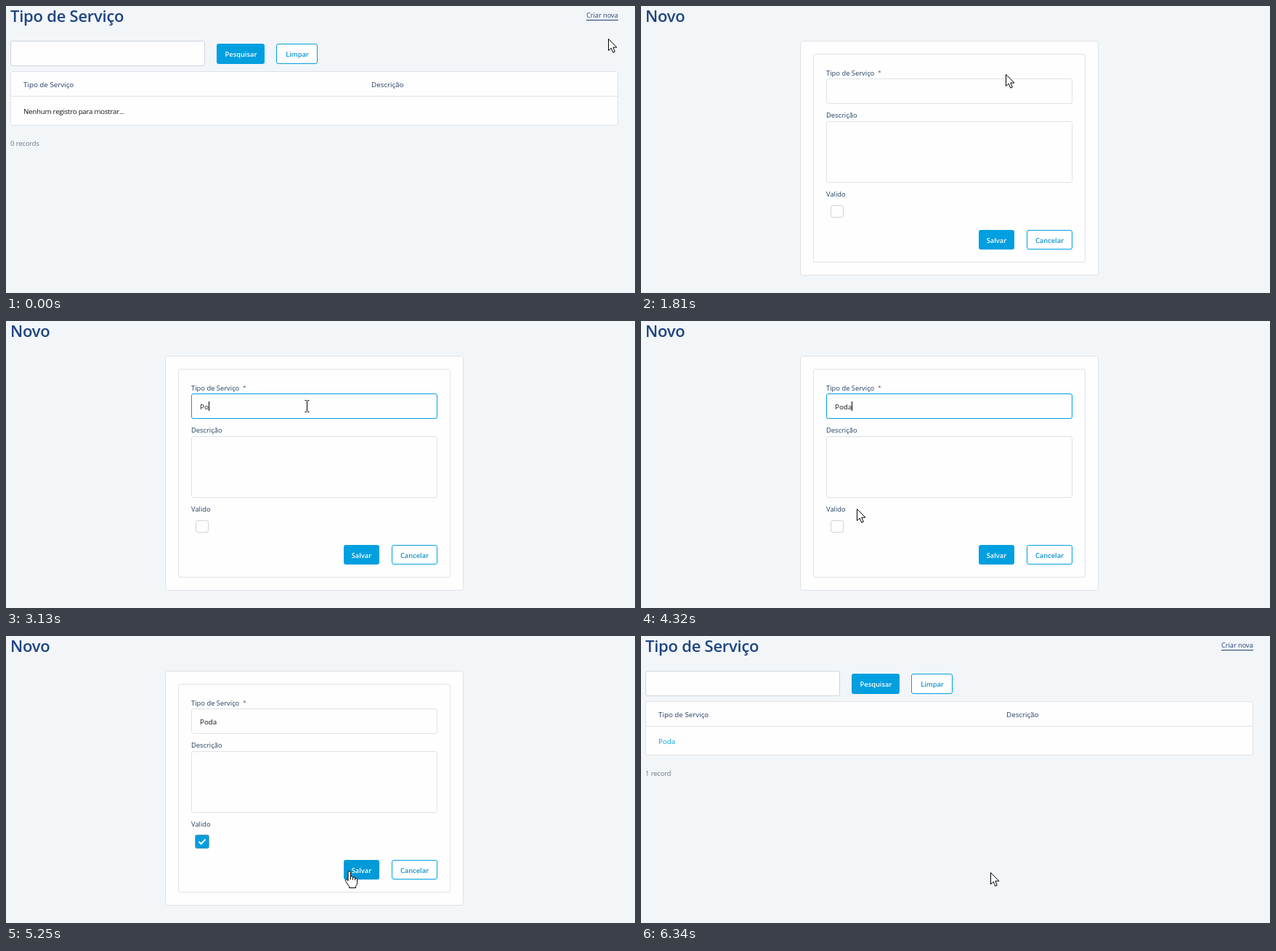
Animation, 866 px wide and 396 px high, one loop 6.51 s. Source, as an HTML page:

```html
<!DOCTYPE html>
<html lang="pt">
<head>
<meta charset="utf-8">
<title>Tipo de Serviço</title>
<style>
html, body { margin: 0; width: 100%; height: 100%; overflow: hidden; background: #f2f6f9; }
svg { display: block; width: 866px; height: 396px; }
text { font: 400 9.8px "Open Sans", "Noto Sans", sans-serif; fill: #283c64; }
.title { font-size: 22px; font-weight: 600; letter-spacing: -.25px; fill: #1f4480; }
.label { font-size: 9.4px; fill: #213f5e; }
.btn { font-size: 9.3px; font-weight: 600; text-anchor: middle; fill: #fff; }
.ghost { fill: #0f92cb; }
.dark { fill: #14181e; }
.small { font-size: 9.2px; }
.box { fill: #fefefe; stroke: #dee2e6; }
.outline { fill: #fff; stroke: #009fdf; }
.blue { fill: #009fdf; }
.hand path, .arrow path { fill: #fff; stroke: #000; stroke-linejoin: round; }
.hand .lines { fill: none; }
</style>
</head>
<body>
<svg viewBox="0 0 866 396">
  <rect width="866" height="396" fill="#f2f6f9"/>

  <g id="list">
    <text class="title" x="6" y="21.5">Tipo de Serviço</text>
    <g id="link">
      <text class="small" x="799" y="16" style="fill:inherit">Criar nova</text>
      <rect x="799" y="19" width="44" height="1"/>
    </g>
    <rect class="box" x="6.5" y="48.5" width="267" height="34" rx="2.5" style="stroke:#ced4da"/>
    <rect class="blue" x="290" y="52" width="66" height="28" rx="3"/>
    <text class="btn" x="323.5" y="70">Pesquisar</text>
    <rect class="outline" x="372.5" y="52.5" width="56" height="27" rx="2.5"/>
    <text class="btn ghost" x="401" y="70">Limpar</text>
    <rect class="box" x="6.5" y="90.5" width="836" height="74" rx="2.5"/>
    <path d="M7 124.5H842" stroke="#dee2e6"/>
    <text x="24" y="112">Tipo de Serviço</text>
    <text x="503" y="112">Descrição</text>
    <text class="dark" id="empty" x="24" y="149" letter-spacing="-.28">Nenhum registro para mostrar...</text>
    <text class="blue" id="row" x="24" y="149">Poda</text>
    <text class="small" id="count" x="6" y="193" style="fill:#6a7084"></text>
  </g>

  <g id="form">
    <text class="title" x="6" y="21.5">Novo</text>
    <rect class="box" x="219.5" y="48.5" width="410" height="323" rx="3"/>
    <rect class="box" x="237.5" y="66.5" width="374" height="287" rx="2.5"/>
    <text class="label" x="255" y="96">Tipo de Serviço</text>
    <text x="326.3" y="94" style="font-size:8px;fill:#7c3d4a">*</text>
    <rect class="box" id="input" x="255.5" y="100.5" width="338" height="34" rx="2.5"/>
    <text class="dark" id="typed" x="267" y="122"></text>
    <rect id="caret" y="111" width="1" height="13"/>
    <text class="label" x="255" y="154">Descrição</text>
    <rect class="box" id="area" x="255.5" y="159.5" width="338" height="84" rx="2.5"/>
    <text class="label" x="255" y="263">Valido</text>
    <rect class="box" x="261.5" y="275.5" width="17" height="16" rx="2.5" style="stroke:#ced4da"/>
    <g id="check">
      <rect class="blue" x="261" y="275" width="18" height="17" rx="3"/>
      <path d="M265.5 283.7L268.6 286.8L274.6 280.6" fill="none" stroke="#fff" stroke-width="2"/>
    </g>
    <rect id="ring" x="261" y="275" width="18" height="17.5" rx="2" fill="none" stroke="#2b8fc0" stroke-width="1.4"/>
    <rect class="blue" x="465" y="309" width="49" height="27" rx="3"/>
    <rect id="shade" x="465" y="309" width="49" height="27" rx="3" fill="#008bc3"/>
    <text class="btn" x="489.5" y="327">Salvar</text>
    <rect class="outline" x="531.5" y="309.5" width="62" height="26" rx="2.5"/>
    <text class="btn ghost" x="562.5" y="327">Cancelar</text>
  </g>

  <g id="cursor">
    <g class="arrow" id="arrow">
      <path d="M0 0V16L3.7 12.6L6.2 18.6L8.8 17.5L6.3 11.6H11.4Z"/>
    </g>
    <g class="hand" id="hand">
      <path d="M-1.5 1.8Q-1.5 0 .3 0Q2 0 2 1.8V7Q4.7 6.4 5 8.3Q7.7 7.7 8 9.5Q11 9 11 11.5V16Q11 19 9 20.8V23H0V21L-4.8 14Q-6.2 11.8-4.4 11.2Q-3 11-1.5 13.4Z"/>
      <path class="lines" d="M2 7V11.5M5 8.3V12M8 9.5V12.5"/>
    </g>
    <path id="beam" d="M-3-8H-1L0-7L1-8H3M0-7V7M-3 8H-1L0 7L1 8H3" fill="none" stroke="#000"/>
  </g>
</svg>
<script>
const LOOP = 6510;
const WORD = 'Poda';
const keyTimes = [2900, 3130, 3450, 3620];
const BLINK = 530;

const start = [829, 45], link = [831, 9], field = [414, 117], box = [275, 286], save = [481, 326];

// Pointer trips, drawn in even steps that slow down towards the end
const trips = [
  { from: start, to: link, begin: 80, end: 480, steps: 6, power: 2 },
  { from: link, to: field, begin: 1630, end: 2270, steps: 9, power: 3.85 },
  { from: field, to: box, begin: 4150, end: 4470, steps: 5, power: 2 },
  { from: box, to: save, begin: 4940, end: 5400, steps: 7, power: 2.5 }
];

const el = {};
document.querySelectorAll('[id]').forEach(n => el[n.id] = n);

const between = (t, a, b) => t >= a && t < b;
const ramp = (t, a, b) => Math.min(1, Math.max(0, (t - a) / (b - a)));
const show = (node, on) => node.style.display = on ? '' : 'none';

function pointerAt(t) {
  const trip = trips.filter(p => p.begin <= t).pop();
  if (!trip) return start;
  const { from, to, begin, end, steps, power } = trip;
  const step = Math.floor(ramp(t, begin, end) * (steps - 1) + 1e-6) + 1;
  const k = 1 - (1 - step / steps) ** power;
  return from.map((v, i) => Math.round(v + (to[i] - v) * k));
}

function drawField(t, hover) {
  const focused = between(t, 2360, 4630);
  el.input.style.stroke = focused ? '#009fdf' : hover ? '#ced4da' : '';

  const pressed = keyTimes.filter(k => k <= t);
  el.typed.textContent = WORD.slice(0, pressed.length);
  el.caret.setAttribute('x', Math.round(267 + el.typed.getComputedTextLength()));
  const lit = Math.floor((t - 2180) / BLINK) % 2 === 0;
  const justTyped = t - pressed.pop() < 140;
  show(el.caret, focused && (lit || justTyped));
}

function draw(t) {
  const [x, y] = pointerAt(t);
  const inside = (l, top, r, b) => x >= l && x < r && y >= top && y < b;
  const form = between(t, 1340, 6270);
  const saved = t >= 6270;

  show(el.form, form);
  show(el.list, !form);
  show(el.empty, !saved);
  show(el.row, saved);
  el.count.textContent = saved ? '1 record' : '0 records';

  const onLink = !form && inside(799, 5, 843, 21);
  const onInput = form && inside(255, 100, 594, 135);
  const onArea = form && inside(255, 159, 594, 244);
  const onCheck = form && inside(261, 275, 279, 292);
  const onSave = form && inside(465, 309, 514, 336);

  el.link.setAttribute('fill', onLink ? '#1a86c8' : '#1f3f74');
  drawField(t, onInput);
  el.area.style.stroke = onArea ? '#ced4da' : '';
  el.check.setAttribute('opacity', ramp(t, 4700, 4970));
  show(el.ring, between(t, 4630, 5640));
  el.shade.setAttribute('opacity', ramp(t, 5200, 5400));

  const hand = onLink || onCheck || onSave;
  const beam = onInput || onArea;
  show(el.hand, hand);
  show(el.beam, beam);
  show(el.arrow, !hand && !beam);
  el.cursor.setAttribute('transform', `translate(${x + .5} ${y + .5})`);
}

function tick() {
  draw(performance.now() % LOOP);
  requestAnimationFrame(tick);
}
tick();
</script>
</body>
</html>
```
